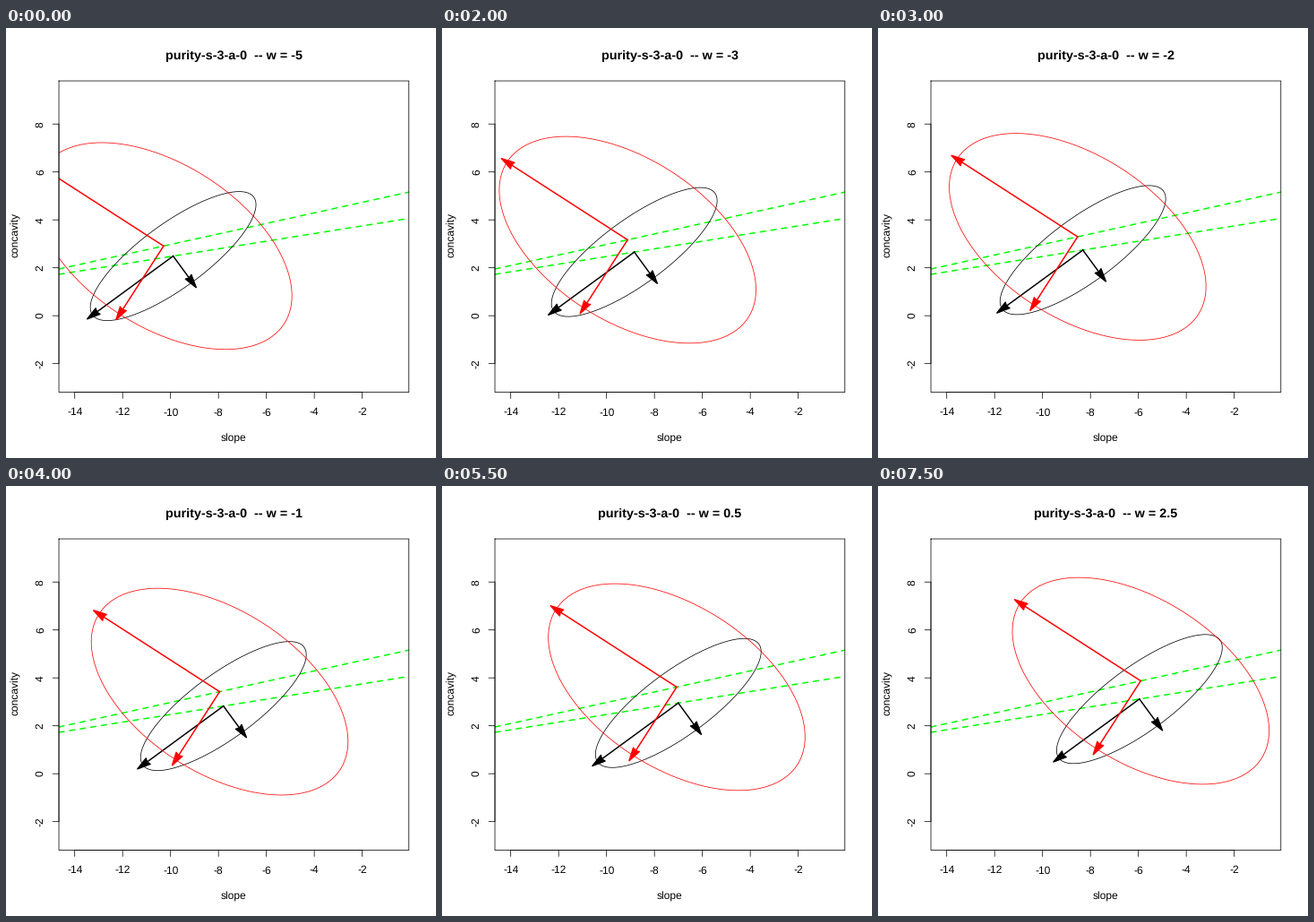
A matplotlib script for the animation above (8 s loop, 480 by 480 pixels).

```python
import numpy as np
import matplotlib.pyplot as plt
from matplotlib.animation import FuncAnimation
from matplotlib.patches import Polygon, Rectangle

plt.rcParams["font.family"] = "Liberation Sans"
plt.rcParams["text.hinting"] = "none"

SIZE, DPI = 480, 72            # at 72 dpi one point is one pixel
LEFT, RIGHT, TOP, BOTTOM = 59.04, 449.76, 59.04, 406.56
UNIT = 26.745                  # pixels per data unit on both axes
THIN, THICK = 0.75, 1.5
FRAMES, INTERVAL = 16, 500

fig = plt.figure(figsize=(SIZE / DPI, SIZE / DPI), dpi=DPI, facecolor="white")
ax = fig.add_axes([0, 0, 1, 1])
ax.set_xlim(0, SIZE)
ax.set_ylim(SIZE, 0)
ax.axis("off")
clip = Rectangle((LEFT, TOP), RIGHT - LEFT, BOTTOM - TOP, transform=ax.transData)


def label(x, y, text, size=12, **kw):
    return ax.text(x, y, text, fontsize=size, ha="center", va="baseline",
                   rotation_mode="anchor", **kw)


def stroke(xs, ys, color="black", lw=THIN, z=1, clipped=False, **kw):
    line, = ax.plot(xs, ys, color=color, lw=lw, zorder=z, snap=False, **kw)
    if clipped:
        line.set_clip_path(clip)
    return line


def draw_axes():
    stroke([LEFT, RIGHT, RIGHT, LEFT, LEFT], [TOP, TOP, BOTTOM, BOTTOM, TOP],
           z=5, solid_joinstyle="miter")
    xs = {v: 76.7 + UNIT * (v + 14) for v in range(-14, -1, 2)}
    ys = {v: 107.2 + UNIT * (8 - v) for v in range(-2, 9, 2)}
    stroke([xs[-14], xs[-2]], [BOTTOM, BOTTOM], z=5)
    stroke([LEFT, LEFT], [ys[-2], ys[8]], z=5)
    for v, x in xs.items():
        stroke([x, x], [BOTTOM, BOTTOM + 7.2], z=5, solid_capstyle="butt")
        label(x, 432.5, str(v))
    for v, y in ys.items():
        stroke([LEFT, LEFT - 7.2], [y, y], z=5, solid_capstyle="butt")
        label(41.8, y, str(v), rotation=90)
    mid_x, mid_y = (LEFT + RIGHT) / 2, (TOP + BOTTOM) / 2
    label(mid_x, 462, "slope")
    label(14, mid_y - 1.5, "concavity", rotation=90)
    return label(mid_x, 34.7, "", 14.4, weight="bold")


# arrowhead along +x, centred on the origin, with a slightly notched base
HEAD = np.array([[7.3, 0], [-7.3, 4], [-6.5, 2], [-6.2, 0], [-6.5, -2], [-7.3, -4]])


class Arrow:
    def __init__(self, vec, color, z):
        self.vec = vec
        self.line = stroke([], [], color, THICK, z, True)
        c, s = vec / np.hypot(*vec)
        self.head_pts = HEAD @ np.array([[c, s], [-s, c]])
        self.head = Polygon(self.head_pts, fc=color, ec=color, lw=THICK,
                            joinstyle="round", zorder=z, snap=False)
        ax.add_patch(self.head)
        self.head.set_clip_path(clip)

    def place(self, centre):
        tip = centre + self.vec
        self.line.set_data(*zip(centre, tip))
        self.head.set_xy(self.head_pts + tip)


class Ellipse:
    """Ellipse with its two axis arrows, sliding along a dashed track."""

    def __init__(self, color, start, step, major, minor, z):
        self.start, self.step = np.array(start), np.array(step)
        major, minor = np.array(major), np.array(minor)
        t = np.linspace(0, 2 * np.pi, 241)[:, None]
        self.pts = np.cos(t) * major + np.sin(t) * minor
        self.curve = stroke([], [], color, THIN, z, True)
        self.arrows = [Arrow(v, color, z + 0.5) for v in (major, minor)]
        ends = np.array([LEFT, RIGHT])
        slope = step[1] / step[0]
        stroke(ends, start[1] + slope * (ends - start[0]), "#00ff00", THICK, 1,
               True, ls=(0, (4, 4)), dash_capstyle="round")

    def place(self, w):
        centre = self.start + self.step * (w + 5)
        self.curve.set_data(*(self.pts + centre).T)
        for arrow in self.arrows:
            arrow.place(centre)


def axis(length, degrees):
    a = np.radians(degrees)
    return length * np.cos(a), length * np.sin(a)


title = draw_axes()
ellipses = [
    Ellipse("black", (186.6, 254.6), (14.03, -2.24),
            axis(111.5, 180 - 36.2), axis(36.1, 90 - 36.2), 2),
    Ellipse("red", (175.9, 243.35), (15.65, -3.44),
            axis(160.2, 180 + 32.8), axis(90.5, 90 + 32.8), 3),
]


def update(i):
    w = -5 + 0.5 * i
    title.set_text(f"purity-s-3-a-0  -- w = {w:g}")
    for e in ellipses:
        e.place(w)
    return []


anim = FuncAnimation(fig, update, frames=FRAMES, interval=INTERVAL,
                     init_func=lambda: update(0), repeat=True, repeat_delay=0)
plt.show()
```
